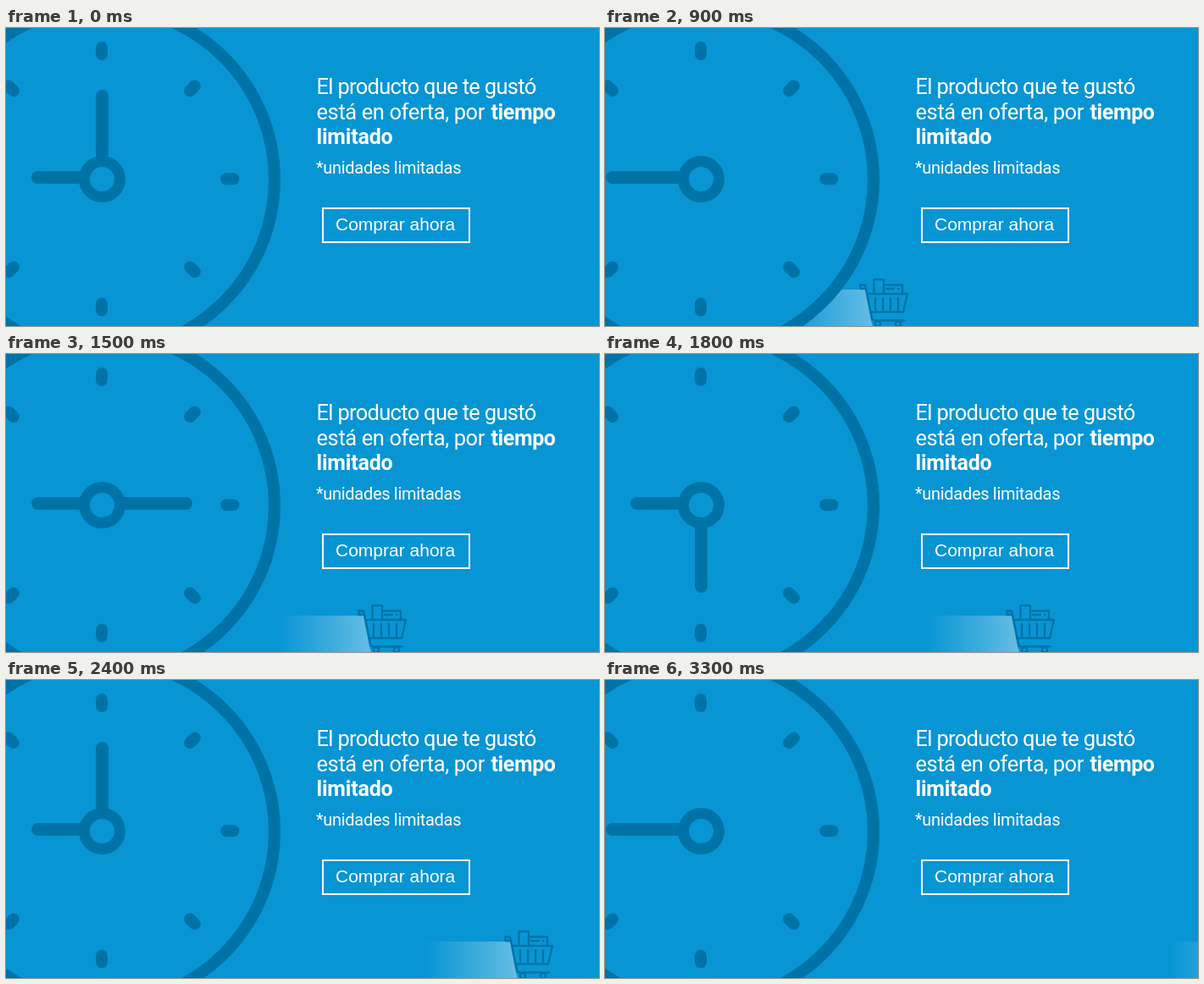
Write an HTML page that moves like this. It is 700 by 352 pixels and loops after 3.6 s.

```html
<!DOCTYPE html>
<html lang="es">
<head>
<meta charset="utf-8">
<style>
  html, body { margin: 0; width: 100%; height: 100%; overflow: hidden; background: #0895d4; }
  svg { display: block; }
  .line { fill: none; stroke: #0073a6; stroke-linecap: round; stroke-linejoin: round; }
  .disc { fill: #0895d4; stroke: #0073a6; }
  text { fill: #fff; font-family: Roboto, "Open Sans", sans-serif; }
  .title { font-size: 25.5px; letter-spacing: -.7px; }
  .bold { font-size: 25px; font-weight: 700; letter-spacing: -.2px; }
</style>
</head>
<body>
<svg width="700" height="352" viewBox="0 0 700 352">
  <defs>
    <linearGradient id="glow">
      <stop offset="0" stop-color="#fff" stop-opacity="0"/>
      <stop offset="1" stop-color="#fff" stop-opacity=".38"/>
    </linearGradient>
  </defs>

  <g id="cart">
    <path d="M-94 309H7L14 346L16 352H-94Z" fill="url(#glow)"/>
    <g class="line" stroke-width="2.3">
      <path d="M1.5 303.5H7L15 342Q15.5 345.5 18.5 345.5H53"/>
      <path d="M1.5 303.5V308H7.5"/>
      <path d="M9 314H57L52 335.5H13.5"/>
      <path d="M19 319V333M28 319V333M37 319V333M46 319V333"/>
      <path d="M17.5 314V297H29V314M29 303.5H51V314M32 308H41M46 308H46.5"/>
      <circle cx="22" cy="349.5" r="3.2"/>
      <circle cx="46" cy="349.5" r="3.2"/>
    </g>
  </g>

  <circle class="disc" cx="113" cy="179" r="204" stroke-width="14"/>
  <g id="ticks" class="line" stroke-width="14"></g>
  <path class="line" d="M37.5 176.5H113" stroke-width="15"/>
  <path id="hand" class="line" stroke-width="15"/>
  <circle class="disc" cx="113.5" cy="178.5" r="21" stroke-width="13"/>

  <text class="title" x="366.5" y="77.5">El producto que te gustó</text>
  <text class="title" x="366.5" y="107.5" style="letter-spacing: -.4px">está en oferta, por</text>
  <text class="title bold" x="572.5" y="107.5" style="letter-spacing: -.4px">tiempo</text>
  <text class="title bold" x="366.5" y="137">limitado</text>
  <text x="366" y="172" font-size="20" letter-spacing="-.3">*unidades limitadas</text>
  <rect x="374" y="213" width="173" height="40" fill="none" stroke="#fff" stroke-width="2"/>
  <text x="389" y="239" style="font: 21px 'Liberation Sans', Arial, sans-serif">Comprar ahora</text>
</svg>
<script>
  const STEP = 300, STEPS = 12;
  const cart = document.getElementById('cart');
  const hand = document.getElementById('hand');
  // Up, right, down, left
  const poses = ['M113.5 178V80.5', 'M113 176.5H212.5', 'M113.5 178V274.5', 'M113 176.5H8.5'];

  document.getElementById('ticks').innerHTML = Array.from({ length: 8 }, (_, i) =>
    `<path d="M113 23V31" transform="rotate(${i * 45} 113 178.3)"/>`).join('');

  function draw(now) {
    const step = Math.floor(now / STEP) % STEPS;
    hand.setAttribute('d', poses[step % 4]);
    cart.setAttribute('transform', `translate(${Math.round(242.4 + (step - 2) * 57.6)} 0)`);
    cart.setAttribute('visibility', step < 2 ? 'hidden' : 'visible');
  }

  const start = performance.now();
  function tick() {
    draw(performance.now() - start);
    requestAnimationFrame(tick);
  }
  tick();
</script>
</body>
</html>
```
